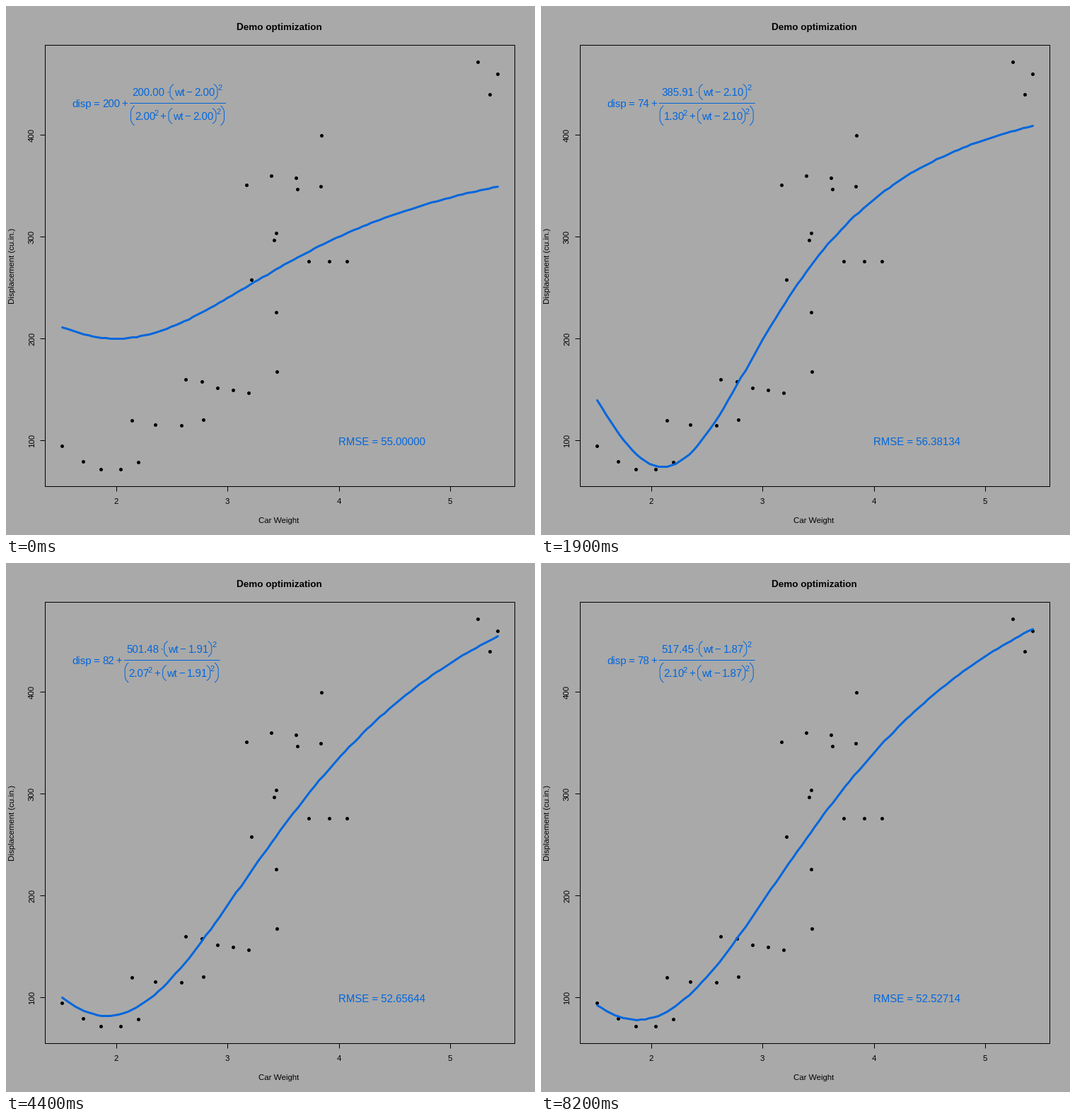
A matplotlib script that plays this animation: 748x748 px, repeating every 8300 ms.

```python
import numpy as np
import matplotlib.pyplot as plt
from matplotlib.animation import FuncAnimation
from matplotlib.patches import PathPatch
from matplotlib.path import Path
from matplotlib.transforms import Affine2D

SIZE, DPI = 748, 88
PT = 72 / DPI  # points per pixel
FRAMES, STEP = 83, 100
GREY, BLUE = "#a9a9a9", "#0066dd"
LEFT, RIGHT, TOP, BOTTOM = 55.35, 719.65, 55.35, 679.15
WEIGHTS, VOLUMES = (1.513, 5.424), (71.1, 472)

# Groups of cars: start, end, number of cars, sag between the ends
GROUPS = [
    ((1.513, 95), (2.2, 79), 5, -14),
    ((2.14, 120), (2.78, 121), 4, -6),
    ((2.62, 160), (3.19, 147), 5, 0),
    ((3.44, 168), (3.435, 304), 3, -10),
    ((3.17, 351), (3.84, 350), 4, 10),
    ((3.215, 258), (3.845, 400), 4, -8),
    ((3.73, 276), (4.07, 276), 3, 0),
    ((5.25, 472), (5.424, 460), 3, -26),
]

# Stages of the fit: step, base, gain, centre, width, score
STAGES = np.array([
    [0, 200, 200, 2.00, 2.00, 55],
    [9, 153, 251.09, 2.25, 1.05, 79.51195],
    [19, 74, 385.91, 2.10, 1.30, 56.38134],
    [29, 58, 458.36, 2.03, 1.53, 54.34103],
    [44, 82, 501.48, 1.91, 2.07, 52.65644],
    [54, 78, 515.64, 1.83, 2.15, 52.56857],
    [82, 78, 517.45, 1.87, 2.10, 52.52714]])


def to_pixel(values, limits, start, end):
    """Centre of the pixel for each value, with a 4% margin in the plot."""
    lo, hi = limits
    pad = 0.04 * (hi - lo)
    part = (np.asarray(values) - lo + pad) / (hi - lo + 2 * pad)
    return np.floor(start + part * (end - start)) + 0.5


def to_x(values):
    return to_pixel(values, WEIGHTS, LEFT, RIGHT)


def to_y(values):
    return to_pixel(values, VOLUMES, BOTTOM, TOP)


def scatter_cars():
    rng = np.random.default_rng(4)
    cars = []
    for start, end, count, sag in GROUPS:
        t = np.linspace(0, 1, count)[:, None]
        bulge = np.sin(np.pi * t)
        noise = rng.uniform(-1, 1, (count, 2)) * (0.02, 2)
        path = np.array(start) * (1 - t) + np.array(end) * t
        cars.append(path + bulge * (noise + (0, sag)))
    return np.vstack(cars).T


def stage_at(step):
    """Ease out from each stage of the fit to the next one."""
    i = min(np.searchsorted(STAGES[:, 0], step, "right"), len(STAGES) - 1)
    a, b = STAGES[i - 1], STAGES[i]
    u = (step - a[0]) / (b[0] - a[0])
    return (a + (b - a) * (1 - (1 - u) ** 3))[1:]


def model(x, base, gain, centre, width):
    d = (x - centre) ** 2
    return base + gain * d / (width ** 2 + d)


plt.rcParams["font.family"] = "Liberation Sans"
plt.rcParams["text.hinting"] = "native"
fig = plt.figure(figsize=(SIZE / DPI, SIZE / DPI), dpi=DPI, facecolor=GREY)
ax = fig.add_axes([0, 0, 1, 1])
ax.set(xlim=(0, SIZE), ylim=(SIZE, 0))
ax.axis("off")

shift = Affine2D()
moving = shift + ax.transData


def label(x, y, text, size=11.4, color="black", ha="center", **kw):
    return ax.text(x, y, text, size=size * PT, color=color, ha=ha,
                   va="baseline", rotation_mode="anchor", **kw)


def line(xs, ys, color="black", width=1, **kw):
    return ax.plot(xs, ys, color=color, lw=width * PT, snap=False,
                   solid_joinstyle="miter", **kw)[0]


def math_text(x, y, text="", size=15, transform=moving):
    return label(x, y, text, size, BLUE, "left", transform=transform)


def paren(x, top, bottom, side):
    """Tall thin bracket; side is 1 for opening and -1 for closing."""
    tip, bend = x + 5 * side, 0.34 * (bottom - top)
    points = [(tip, top), (x, top + 0.45 * bend), (x, top + bend),
              (x, bottom - bend), (x, bottom - 0.45 * bend), (tip, bottom)]
    codes = [Path.MOVETO, Path.CURVE3, Path.CURVE3,
             Path.LINETO, Path.CURVE3, Path.CURVE3]
    ax.add_patch(PathPatch(Path(points, codes), fc="none", ec=BLUE,
                           lw=PT, transform=moving))


# Frame, ticks and titles
x0, x1, y0, y1 = np.floor([LEFT, RIGHT, TOP, BOTTOM]) + 0.5
line([x0, x1, x1, x0, x0], [y0, y0, y1, y1, y0], solid_capstyle="projecting")
for tick in range(2, 6):
    x = to_x(tick)
    line([x, x], [y1, y1 + 7], solid_capstyle="butt")
    label(x - 0.5, 704, str(tick))
for tick in range(100, 500, 100):
    y = to_y(tick)
    line([x0 - 7, x0], [y, y], solid_capstyle="butt")
    label(40, y - 0.5, str(tick), rotation=90)
label(386.5, 34, "Demo optimization", 13.5, weight="bold")
label(385.7, 731, "Car Weight")
label(12, 367, "Displacement (cu.in.)", rotation=90)

weight, volume = scatter_cars()
ax.plot(to_x(weight), to_y(volume), "o", color="black", ms=5 * PT, mew=0,
        snap=False)

grid = np.linspace(*WEIGHTS, 101)
curve = line(to_x(grid), grid, BLUE, 3, zorder=3, solid_capstyle="round")

# Formula
math_text(93.2, 143, "disp", transform=ax.transData)
math_text(122.8, 143, "=", transform=ax.transData)
base_text = math_text(136.3, 143, transform=ax.transData)
math_text(163.5, 143, "+")
line([175.5, 310.5], [137.5, 137.5], BLUE, transform=moving)

gain_text = math_text(178.4, 126.5)
math_text(225.8, 126.5, "\u00b7")
paren(232, 110.5, 132.5, 1)
math_text(237.6, 126.5, "wt")
math_text(254, 126.5, "\u2212")
centre_top = math_text(266, 126.5)
paren(299, 110.5, 132.5, -1)
math_text(299.8, 119, "2", 11)

paren(176.5, 141, 169, 1)
width_text = math_text(182, 160.5)
math_text(209, 155, "2", 11)
math_text(217.5, 160.5, "+")
paren(230, 144.5, 166.5, 1)
math_text(235.8, 160.5, "wt")
math_text(252.2, 160.5, "\u2212")
centre_low = math_text(264.2, 160.5)
paren(297, 144.5, 166.5, -1)
math_text(297.2, 153, "2", 11)
paren(308.5, 141, 169, -1)

score_text = math_text(469.8, 621, transform=ax.transData)


def update(step):
    base, gain, centre, width, score = stage_at(step)
    curve.set_ydata(to_y(model(grid, base, gain, centre, width)))
    digits = f"{base:.0f}"
    base_text.set_text(digits)
    shift.clear().translate(8.34 * (len(digits) - 3), 0)
    gain_text.set_text(f"{gain:.2f}")
    width_text.set_text(f"{width:.2f}")
    for text in (centre_top, centre_low):
        text.set_text(f"{centre:.2f}")
    score_text.set_text(f"RMSE = {score:.5f}")
    return []


anim = FuncAnimation(fig, update, frames=FRAMES, interval=STEP, repeat=True)
plt.show()
```
